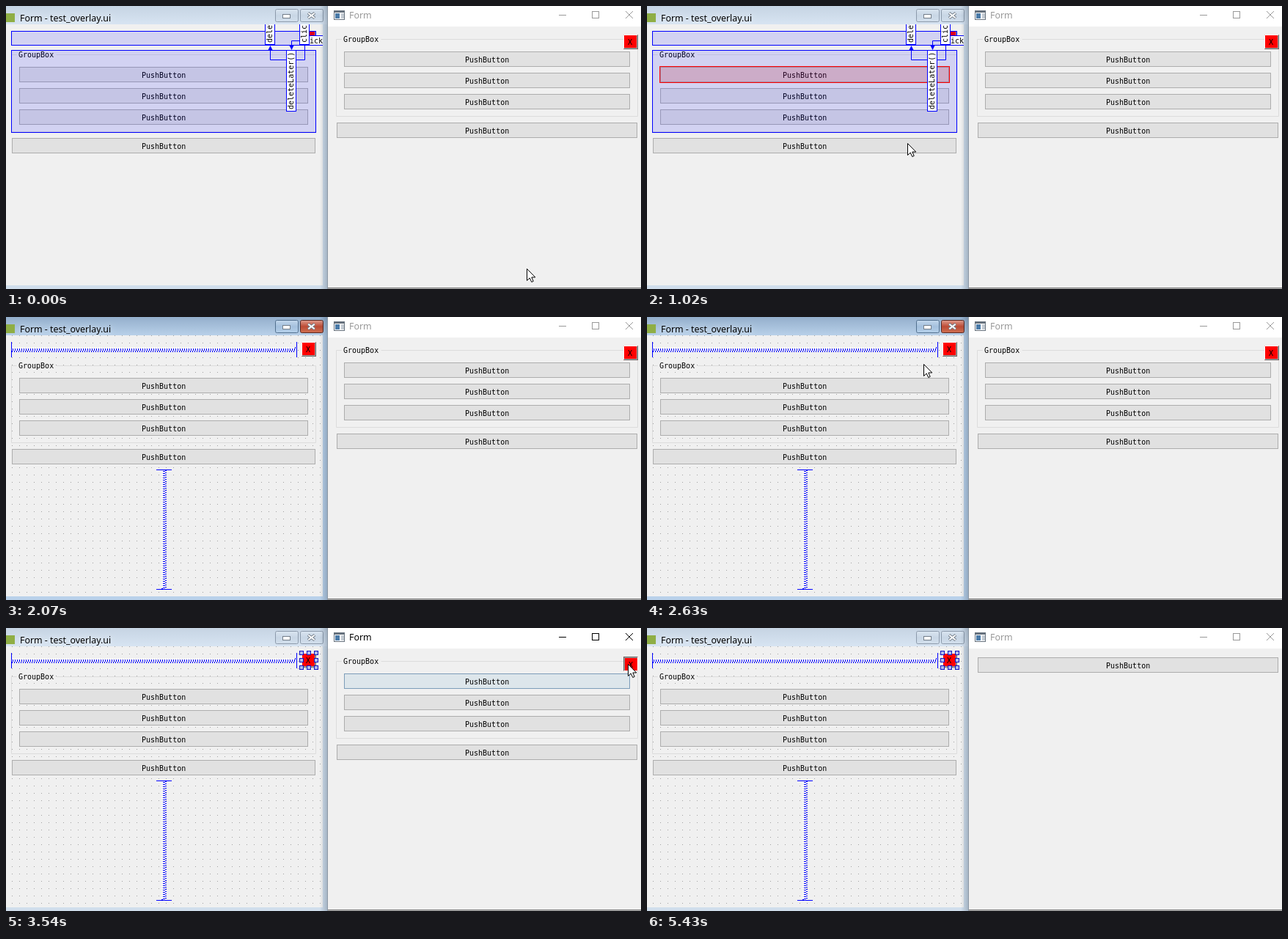
These frames come from a looping animation (866x386 px, 5.56 s). An HTML page with a canvas:

```html
<!DOCTYPE html>
<html lang="en">
<head>
<meta charset="utf-8">
<title>Form designer and preview</title>
<style>
  html, body { margin: 0; width: 100%; height: 100%; overflow: hidden; background: #f0f0f0; }
  canvas { display: block; }
</style>
</head>
<body>
<canvas id="stage" width="866" height="386"></canvas>
<script>
const ctx = document.getElementById('stage').getContext('2d');
const LOOP = 5560;
const POINTER_STEP = 64.7;
const MONO = '10px "DejaVu Sans Mono", monospace';
const SANS = '12.4px "Noto Sans", sans-serif';
const BLUE = '#0000ff';

// Turning points of the pointer: time, x, y. It leaves through the top and the bottom edge.
const pointerKeys = [
  [60, 710, 358], [580, 421, 320], [830, 364, 305], [1160, 340, -24],
  [2330, 224, -24], [2650, 398, 76], [2840, 416, 44],
  [3095, 777, 75], [3470, 848, 49], [3720, 848, 49],
  [4040, 783, 116], [4350, 808, 61], [4730, 834, 331], [5060, 830, 390]
];

function fill(color, x, y, w, h) {
  ctx.fillStyle = color;
  ctx.fillRect(x, y, w, h);
}

function box(x, y, w, h, background, border) {
  if (background) fill(background, x, y, w, h);
  ctx.strokeStyle = border;
  ctx.lineWidth = 1;
  ctx.strokeRect(x + 0.5, y + 0.5, w - 1, h - 1);
}

// Crisp one pixel polyline through flat x, y pairs.
function line(color, ...points) {
  ctx.strokeStyle = color;
  ctx.lineWidth = 1;
  ctx.beginPath();
  for (let i = 0; i < points.length; i += 2) ctx.lineTo(points[i] + 0.5, points[i + 1] + 0.5);
  ctx.stroke();
}

function arrowHead(tipX, tipY, direction) {
  ctx.fillStyle = BLUE;
  ctx.beginPath();
  ctx.moveTo(tipX, tipY);
  ctx.lineTo(tipX + 3.5, tipY - 7 * direction);
  ctx.lineTo(tipX - 3.5, tipY - 7 * direction);
  ctx.fill();
}

function text(string, x, y, font = MONO, color = '#000') {
  ctx.font = font;
  ctx.fillStyle = color;
  ctx.fillText(string, x, y);
}

function blend(x0, y0, x1, y1, ...colors) {
  const gradient = ctx.createLinearGradient(x0, y0, x1, y1);
  colors.forEach((color, i) => gradient.addColorStop(i / (colors.length - 1), color));
  return gradient;
}

function pushButton(x, y, w, hovered) {
  box(x, y, w, 21, hovered ? '#dde6eb' : '#e1e1e1', hovered ? '#7d9db9' : '#adadad');
  text('PushButton', x + w / 2 - 30, y + 15);
}

function groupBox(x, y, w, h, hovered) {
  line('#dcdcdc', x + 7, y, x, y, x, y + h, x + w, y + h, x + w, y, x + 61, y);
  text('GroupBox', x + 10, y + 4);
  for (let i = 0; i < 3; i++) pushButton(x + 11, y + 17 + 29 * i, w - 21, hovered && i === 0);
}

// Classic bevel: raised has its shadow at the bottom right, pressed at the top left.
function closeButton(x, y, pressed) {
  const [topLeft, bottomRight] = pressed ? ['#696969', '#fff'] : ['#fff', '#696969'];
  const inner = pressed ? 1 : 18, shift = pressed ? 1 : 0;
  fill('#f00', x, y, 20, 20);
  fill('#a0a0a0', x + 1, y + inner, 18, 1);
  fill('#a0a0a0', x + inner, y + 1, 1, 18);
  line(topLeft, x, y + 19, x, y, x + 19, y);
  line(bottomRight, x, y + 19, x + 19, y + 19, x + 19, y);
  text('X', x + 6 + shift, y + 14 + shift);
}

function titleButton(x, w, colors, border) {
  ctx.beginPath();
  ctx.roundRect(x + 0.5, 4.5, w, 17, 2);
  ctx.fillStyle = blend(0, 4, 0, 22, ...colors);
  ctx.fill();
  ctx.strokeStyle = border;
  ctx.lineWidth = 1;
  ctx.stroke();
}

function cross(x, y, rx, ry, color, width) {
  ctx.strokeStyle = color;
  ctx.lineWidth = width;
  ctx.beginPath();
  ctx.moveTo(x - rx, y - ry);
  ctx.lineTo(x + rx, y + ry);
  ctx.moveTo(x + rx, y - ry);
  ctx.lineTo(x - rx, y + ry);
  ctx.stroke();
}

function designerFrame(active) {
  const titleColors = active ? ['#94afcc', '#b8d0e9'] : ['#c6d4e3', '#d7e4f2'];
  fill(active ? '#b9d1ea' : '#d0deec', 0, 0, 438, 386);
  fill(blend(0, 0, 0, 25, ...titleColors), 0, 0, 438, 25);
  fill('#f0f0f0', 0, 25, 432, 356);
  fill('#8fae45', 0, 10, 12, 12);
  ctx.save();
  ctx.shadowColor = 'rgba(255,255,255,.8)';
  ctx.shadowBlur = 8;
  text('Form - test_overlay.ui', 19, 21, SANS);
  ctx.restore();

  const border = active ? '#52708f' : '#8c9aab';
  const plain = active ? ['#c5d9ed', '#a4c0dd', '#b5d0ea'] : ['#dbe6f1', '#c8d6e5', '#d3e0ed'];
  titleButton(367, 31, plain, border);
  titleButton(401, 31, active ? ['#e2a293', '#bd4b35', '#cf7152'] : plain, active ? '#5a2822' : border);
  box(377, 11, 11, 6, '#fff', '#737e8a');
  cross(416.5, 13, 4.5, 3.5, '#737e8a', 4);
  cross(416.5, 13, 4.2, 3.2, '#fff', 2);
}

// Vertical labels read upwards from the given bottom edge.
function verticalLabel(string, x, bottom) {
  const height = string.length * 6 + 5;
  box(x, bottom - height, 14, height + 1, '#fff', BLUE);
  ctx.save();
  ctx.translate(x + 10, bottom - 2);
  ctx.rotate(-Math.PI / 2);
  text(string, 0, 0);
  ctx.restore();
}

function connections(hovered) {
  const tint = 'rgba(0,0,255,.125)';
  box(7, 34, 416, 20, tint, BLUE);
  box(7, 60, 416, 113, tint, BLUE);
  if (hovered) box(17, 82, 396, 23, 'rgba(255,0,0,.125)', '#f00');
  line(BLUE, 407, 53, 407, 73, 360, 73, 360, 58);
  arrowHead(360.5, 54, -1);
  line(BLUE, 406, 47, 389, 47, 389, 56);
  arrowHead(389.5, 60, 1);
  box(400, 40, 60, 14, '#fff', BLUE);
  text('clicked()', 402, 51);
  verticalLabel('deleteLater()', 353, 52);
  verticalLabel('clicked()', 400, 52);
  verticalLabel('deleteLater()', 382, 143);
}

// A zigzag of slanted pixel strokes between two end bars.
function spacer(x, y, length, vertical) {
  const pixel = (color, along, across) =>
    vertical ? fill(color, x + across, y + along, 1, 1) : fill(color, x + along, y + across, 1, 1);
  for (let i = 0; i + 3 < length; i += 3) {
    for (let row = 0; row < 7; row++) {
      pixel('#fff', i + Math.round((6 - row) / 6), 13 - row);
      pixel(BLUE, i + 1 + Math.round(row / 3), 13 - row);
    }
  }
  for (let across = 0; across <= 20; across++) {
    pixel(BLUE, 0, across);
    pixel(BLUE, length, across);
  }
}

function grid() {
  for (let x = 8; x < 432; x += 10)
    for (let y = 25; y < 380; y += 10) fill('#a0a0a0', x, y, 1, 1);
}

function selectionHandles(x, y) {
  for (let column = 0; column < 3; column++)
    for (let row = 0; row < 3; row++)
      if (column !== 1 || row !== 1) box(x + 10 * column, y + 10 * row, 6, 6, '#b0bcec', '#1010c0');
}

function designer(t) {
  const showsSignals = t < 2070;
  designerFrame(t >= 1160 && t < 3540);
  ctx.save();
  ctx.beginPath();
  ctx.rect(0, 25, 432, 356);
  ctx.clip();
  if (!showsSignals) grid();
  groupBox(7, 66, 415, 105);
  pushButton(8, 180, 414);
  closeButton(403, 34);
  if (showsSignals) {
    connections(t >= 970);
  } else {
    spacer(7, 34, 389);
    spacer(205, 208, 163, true);
    if (t >= 2840) selectionHandles(400, 31);
  }
  ctx.restore();
}

function previewFrame(active) {
  const ink = active ? '#000' : '#999';
  fill(blend(428, 0, 438, 0, 'rgba(40,60,80,0)', 'rgba(40,60,80,.25)'), 428, 0, 10, 386);
  fill('#f0f0f0', 438, 0, 428, 386);
  fill('#fff', 439, 0, 427, 28);
  fill('#8c98a5', 438, 0, 1, 386);
  fill('#7a7a7a', 439, 384, 427, 1);
  fill('#b4b4b4', 439, 385, 427, 1);

  box(447, 6, 15, 13, '#fff', '#66717d');
  fill('#66717d', 448, 7, 13, 2);
  fill('#4a7aa8', 449, 10, 6, 7);
  fill('#c4cbd2', 457, 10, 4, 7);
  text('Form', 468, 17, SANS, ink);
  fill(ink, 754, 12, 10, 1);
  box(799, 7, 10, 10, null, ink);
  cross(850, 12, 5, 5, ink, 1);
}

function preview(t) {
  previewFrame(t >= 3470 && t < 5380);
  if (t >= 3600) {
    pushButton(451, 40, 410);
    return;
  }
  groupBox(450, 45, 411, 105, t >= 3030);
  pushButton(451, 159, 410);
  closeButton(842, 39, t >= 3540);
}

// The pointer eases from one turning point to the next, sampled in even steps.
function pointerPosition(t) {
  const sampled = 58 + Math.floor((t - 58) / POINTER_STEP) * POINTER_STEP;
  const next = pointerKeys.findIndex(key => key[0] > sampled);
  if (next <= 0) return pointerKeys.at(next).slice(1);
  const [t0, x0, y0] = pointerKeys[next - 1];
  const [t1, x1, y1] = pointerKeys[next];
  const u = (sampled - t0) / (t1 - t0);
  const eased = u * u * (3 - 2 * u);
  return [x0 + (x1 - x0) * eased, y0 + (y1 - y0) * eased].map(Math.round);
}

function pointer(t) {
  const outline = new Path2D('M.5 .5V16.5L4.2 13L6.8 18.5L9.2 17.4L6.8 12H11.8Z');
  ctx.save();
  ctx.translate(...pointerPosition(t));
  ctx.fillStyle = '#fff';
  ctx.strokeStyle = '#000';
  ctx.lineWidth = 1;
  ctx.fill(outline);
  ctx.stroke(outline);
  ctx.restore();
}

const start = performance.now();

function draw() {
  const t = (performance.now() - start) % LOOP;
  designer(t);
  preview(t);
  pointer(t);
  requestAnimationFrame(draw);
}

draw();
</script>
</body>
</html>
```
